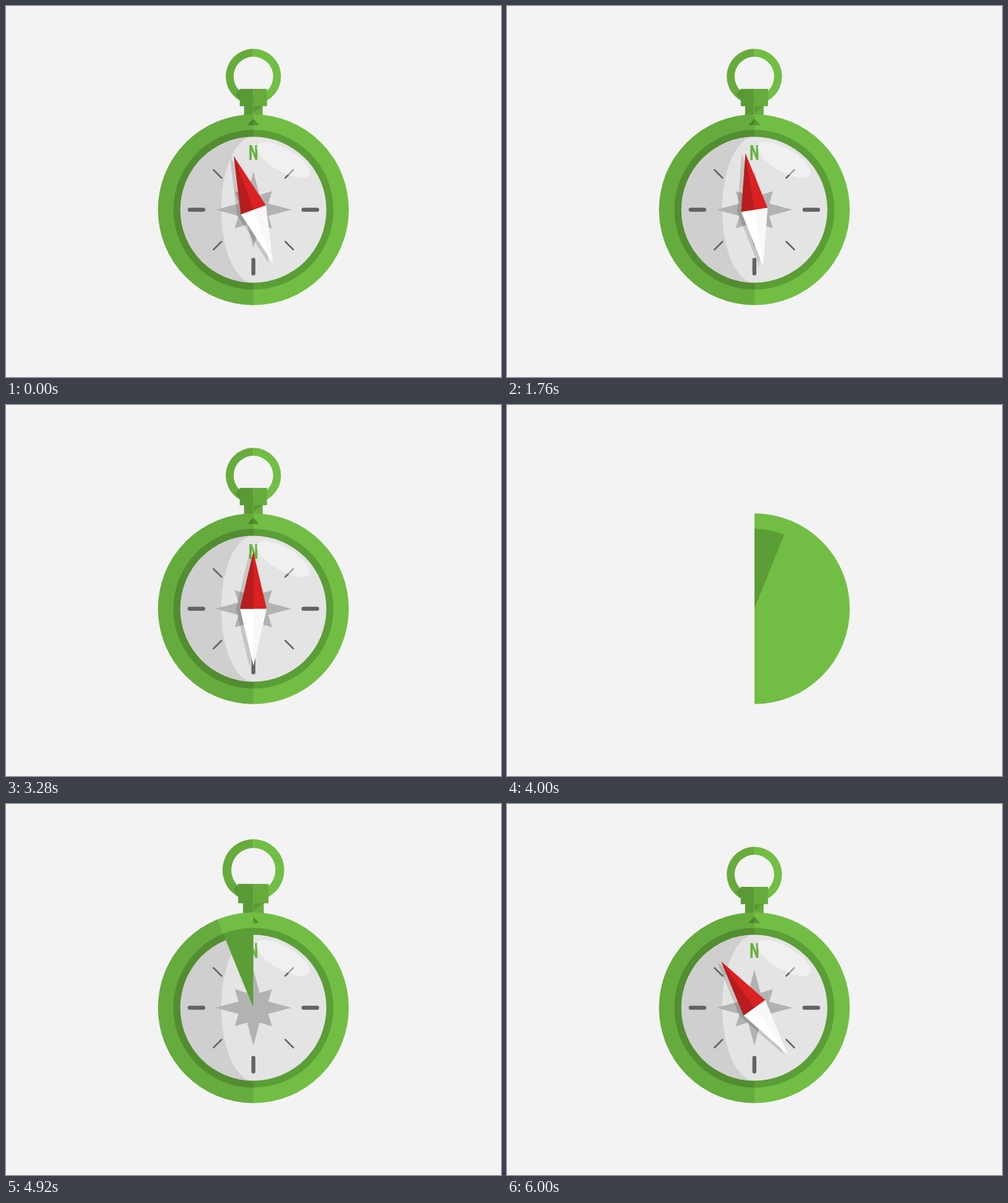
Recreate the animation shown at these times as an HTML page. Size 800x600 px, loop 6.04 s.

```html
<!DOCTYPE html>
<html lang="en">
<head>
<meta charset="utf-8">
<title>Compass</title>
<style>
html, body { margin: 0; width: 100%; height: 100%; overflow: hidden; background: #f3f3f3; }
svg { display: block; width: 100vw; height: 100vh; }
</style>
</head>
<body>
<svg viewBox="0 0 800 600" role="img" aria-label="Compass">
  <defs>
    <clipPath id="rimClip"><path id="rimPie"/></clipPath>
    <clipPath id="wellClip"><path id="wellPie"/></clipPath>
    <clipPath id="faceClip"><path id="facePie"/></clipPath>
  </defs>
  <!-- everything is placed relative to the dial centre -->
  <g id="compass">
    <g id="crown">
      <path d="M0-260.2A44.7 44.7 0 0 1 0-170.8V-183.5A32 32 0 0 0 0-247.5Z" fill="#72be44"/>
      <path d="M0-260.2A44.7 44.7 0 0 0 0-170.8V-183.5A32 32 0 0 1 0-247.5Z" fill="#67ab3d"/>
      <path d="M-29-187L-22-195V-177Z" fill="#579534"/>
      <path d="M-22-195.5H0V-153H-15V-167.5H-22Z" fill="#5a9a36"/>
      <path d="M0-195.5H22V-167.5H15V-153H0Z" fill="#67ab3d"/>
      <path d="M0-167.5H15L0-157Z" fill="#5a9a36"/>
    </g>
    <circle r="154.2" fill="#72be44" clip-path="url(#rimClip)"/>
    <circle r="129.3" fill="#5b9d36" clip-path="url(#wellClip)"/>
    <g clip-path="url(#faceClip)">
      <path d="M0-154.2A154.2 154.2 0 0 0 0 154.2Z" opacity=".1"/>
      <path d="M0-147.5L-9.5-137H0Z" fill="#4a812b"/>
      <path d="M0-147.5L9.5-137H0Z" fill="#549133"/>
      <circle r="118" fill="#e4e4e4"/>
      <path d="M0-118A118 118 0 0 0 0 118A52 118 0 0 1 0-118Z" fill="#cfcfcf"/>
      <path id="rose" fill="#b2b2b2"/>
      <g stroke="#636363" stroke-linecap="round">
        <path d="M-103 0H-81M81 0H103M0 81V103" stroke-width="6.4"/>
        <path d="M-64.5-64.5L-51.5-51.5M64.5-64.5L51.5-51.5M-64.5 64.5L-51.5 51.5M64.5 64.5L51.5 51.5" stroke-width="2.5"/>
      </g>
      <path d="M-6.5-80.5V-104.5H-2.6L2.8-90V-104.5H6.5V-80.5H3L-2.8-96V-80.5Z" fill="#68b23f"/>
      <ellipse cx="48" cy="-80.5" rx="48.5" ry="18.5" transform="rotate(30 48 -80.5)" fill="#fff" opacity=".42"/>
    </g>
    <g id="shadow" opacity=".13">
      <path class="north" d="M0-92L21.5 0H-21.5Z"/>
      <path class="south" d="M0 92L21.5 0H-21.5Z"/>
    </g>
    <g id="needle">
      <g class="south">
        <path d="M-21.5 0H21.5L0 92Z" fill="#fff"/>
        <path d="M0 0H21.5L0 92Z" fill="#f8f8f8"/>
      </g>
      <g class="north">
        <path d="M-21.5 0H21.5L0-92Z" fill="#db2122"/>
        <path d="M-21.5 0H0V-92Z" fill="#b71d1e"/>
      </g>
    </g>
  </g>
</svg>
<script>
const LOOP = 6040, FRAME = 40, BUILD = 3800, EXIT = 9400;
const byId = id => document.getElementById(id);
const clamp = v => Math.max(0, Math.min(1, v));
const progress = (t, start, length) => clamp((t - start) / length);

// Cubic bezier easing (.4, 0, .2, 1)
function ease(x) {
  let lo = 0, hi = 1;
  for (let i = 0; i < 24; i++) {
    const s = (lo + hi) / 2, r = 1 - s;
    if (1.2 * s * r * r + 0.6 * s * s * r + s * s * s < x) lo = s; else hi = s;
  }
  return lo * lo * (3 - 2 * lo);
}

function backOut(x) {
  const v = x - 1, c = 2.2;
  return 1 + (c + 1) * v ** 3 + c * v * v;
}

// Needle turns: [time, degrees]
const swings = [[5787, -65], [6660, 67.5], [7330, -83], [8310, 16], [9290, 0]];

function needleAngle(t) {
  if (t <= swings[0][0]) return swings[0][1];
  for (let i = 1; i < swings.length; i++) {
    const [t0, a0] = swings[i - 1], [t1, a1] = swings[i];
    if (t < t1) return a0 + (a1 - a0) * ease((t - t0) / (t1 - t0));
  }
  return 0;
}

function pie(turn) {
  const r = 300;
  if (turn <= 0.0005) return "M0 0Z";
  if (turn >= 0.9995) return `M${-r} ${-r}H${r}V${r}H${-r}Z`;
  const a = turn * 2 * Math.PI;
  return `M0 0V${-r}A${r} ${r} 0 ${turn > 0.5 ? 1 : 0} 1 ${r * Math.sin(a)} ${-r * Math.cos(a)}Z`;
}

function drawRose() {
  const points = [];
  for (let i = 0; i < 16; i++) {
    const r = i % 2 ? 26 : i % 4 ? 42.5 : 61.5, a = i * Math.PI / 8;
    points.push(`${r * Math.sin(a)} ${-r * Math.cos(a)}`);
  }
  byId("rose").setAttribute("d", `M${points.join("L")}Z`);
}

function scaleAll(selector, s) {
  for (const el of document.querySelectorAll(selector)) {
    el.setAttribute("transform", `scale(${s})`);
    el.setAttribute("visibility", s > 0.001 ? "visible" : "hidden");
  }
}

function render(ms) {
  let t = Math.floor((ms % LOOP) / FRAME) * FRAME;
  if (t < BUILD) t += LOOP;

  const size = 1 - ease(progress(t, EXIT, 440));
  byId("compass").setAttribute("transform", `translate(399.8 329.5) scale(${size})`);

  const wipe = (id, start) => byId(id).setAttribute("d", pie(ease(progress(t, start, 600))));
  wipe("rimPie", 3790);
  wipe("wellPie", 3913);
  wipe("facePie", 4500);

  const crown = backOut(progress(t, 4744, 419));
  byId("crown").setAttribute("transform", `translate(0 -153.5) scale(${crown}) translate(0 153.5)`);
  byId("crown").setAttribute("visibility", crown > 0.001 ? "visible" : "hidden");

  const grow = progress(t, 5640, 240);
  scaleAll(".north", backOut(progress(t, 5160, 560)));
  scaleAll(".south", grow * grow * (3 - 2 * grow));

  const angle = needleAngle(t);
  byId("needle").setAttribute("transform", `rotate(${angle})`);
  byId("shadow").setAttribute("transform", `translate(-6.5 0.5) rotate(${angle})`);
}

drawRose();
const begin = performance.now();
function tick() {
  render(performance.now() - begin);
  requestAnimationFrame(tick);
}
tick();
</script>
</body>
</html>
```
